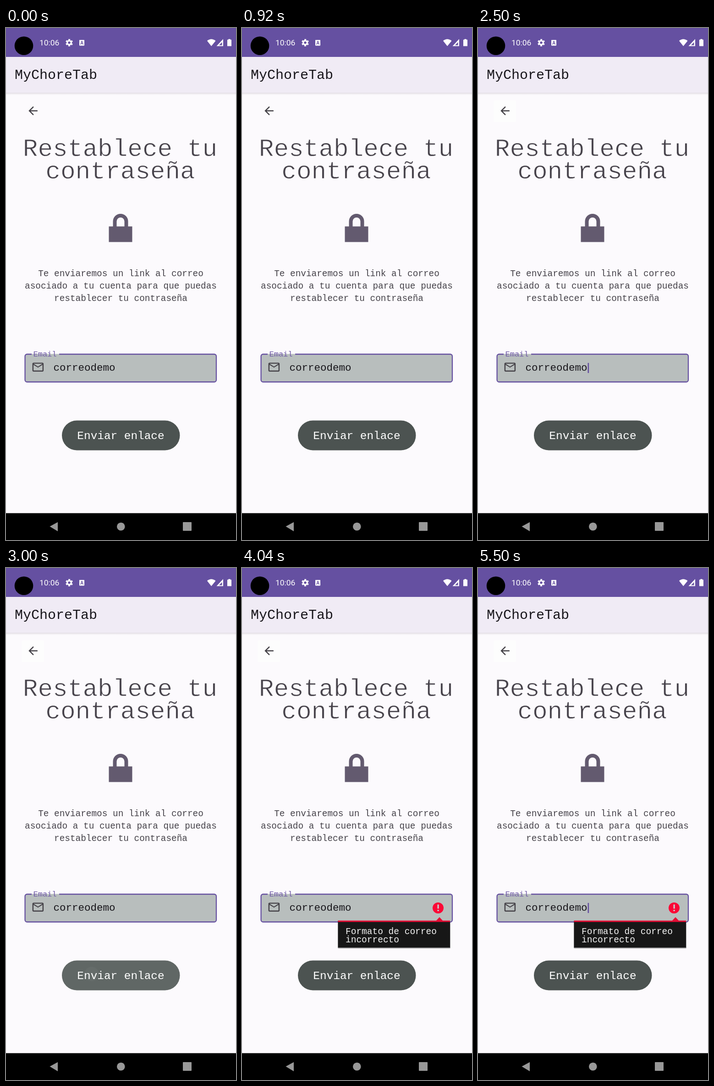
Recreate the animation shown at these times as an HTML page. Size 502 px wide and 1116 px high, loop 5.54 s.

```html
<!DOCTYPE html>
<html lang="es">
<head>
<meta charset="utf-8">
<title>Restablece tu contraseña</title>
<style>
  html, body { margin: 0; width: 100%; height: 100%; overflow: hidden; background: #fcfafd; }
  svg { display: block; width: 100%; height: 100%; }
  text { font-family: "Liberation Mono", monospace; white-space: pre; }
  .middle { text-anchor: middle; }
  /* The background-coloured outline thins the strokes of the large title. */
  .title { font-size: 54.4px; fill: #47434b; stroke: #fcfafd; stroke-width: .9px; }
  .message { font-size: 19.4px; fill: #454249; }
  .error { font-size: 19.5px; fill: #f4f4f4; }
</style>
</head>
<body>
<svg viewBox="0 0 502 1116">
  <defs>
    <linearGradient id="barShadow" x2="0" y2="1">
      <stop stop-color="#e2dde4"/>
      <stop offset="1" stop-color="#fcfafd"/>
    </linearGradient>
    <clipPath id="buttonShape"><rect x="122" y="855.500" width="257.500" height="65" rx="32.500"/></clipPath>
  </defs>
  <rect width="502" height="1116" fill="#fcfafd"/>

  <!-- Status bar -->
  <rect width="502" height="63" fill="#6550a1"/>
  <circle cx="39" cy="38.700" r="20.300"/>
  <g fill="#fff">
    <text x="73" y="38.300" style="font: 17.4px Roboto, sans-serif">10:06</text>
    <g fill="none" stroke="#fff" transform="rotate(30 138 32)">
      <circle cx="138" cy="32" r="4.300" stroke-width="3.200"/>
      <circle cx="138" cy="32" r="6.800" stroke-width="2.400" stroke-dasharray="3.8 3.32" stroke-dashoffset="1.900"/>
    </g>
    <rect x="160" y="26" width="11" height="12.500" rx="1"/>
    <text x="165.500" y="36" class="middle" fill="#6550a1" style="font: bold 10px Roboto, sans-serif">A</text>
    <path d="M439 28Q448 20.500 457.500 28L448.200 39.500Z"/>
    <path d="M474 24V39.500H459.500Z"/>
    <path d="M471.500 31V37.500H465Z" fill="#6550a1"/>
    <path d="M485.500 24h4v1.500h2.500V39.500H483V25.500h2.500Z"/>
  </g>

  <!-- App bar -->
  <rect y="63" width="502" height="78" fill="#f0ebf5"/>
  <rect y="141" width="502" height="5" fill="url(#barShadow)"/>
  <text x="19" y="111" font-size="30" fill="#17151a">MyChoreTab</text>

  <rect id="backPlate" x="34" y="158" width="49" height="47" rx="3" fill="#fdfdfd"/>
  <path transform="translate(44.400 165.800) scale(1.22)" fill="#444147"
    d="M20 11H7.830l5.590-5.590L12 4l-8 8 8 8 1.410-1.410L7.830 13H20z"/>

  <text class="title middle" x="249" y="279">Restablece tu</text>
  <text class="title middle" x="249.500" y="327.500">contraseña</text>

  <!-- Padlock -->
  <g fill="#635a6f">
    <rect x="224.500" y="432.500" width="51" height="34"/>
    <path d="M237.500 434V421.500a12.500 12.500 0 0 1 25 0V434" fill="none" stroke="#635a6f" stroke-width="8"/>
  </g>

  <text class="message middle" x="250.500" y="541">Te enviaremos un link al correo</text>
  <text class="message middle" x="250.500" y="568">asociado a tu cuenta para que puedas</text>
  <text class="message middle" x="250.500" y="595">restablecer tu contraseña</text>

  <!-- Email field -->
  <rect x="41" y="710.500" width="418" height="61" rx="5" fill="#b8bebd"/>
  <path d="M56 711H46a4.500 4.500 0 0 0-4.500 4.500V767a4.500 4.500 0 0 0 4.500 4.500H454.500a4.500 4.500 0 0 0 4.500-4.500V715.500a4.500 4.500 0 0 0-4.500-4.500H116"
    fill="none" stroke="#6650a0" stroke-width="2.300"/>
  <text x="59.500" y="716" font-size="17" fill="#6d58a5">Email</text>
  <path transform="translate(55.200 724.500) scale(1.22)" fill="#444147"
    d="M22 6c0-1.100-.9-2-2-2H4c-1.100 0-2 .9-2 2v12c0 1.100.9 2 2 2h16c1.100 0 2-.9 2-2V6zm-2 0l-8 5-8-5h16zm0 12H4V8l8 5 8-5v10z"/>
  <text x="103.500" y="747" font-size="22.500" fill="#17151a">correodemo</text>
  <rect id="cursor" x="239.500" y="730" width="2.600" height="22" fill="#6650a0"/>

  <!-- Button -->
  <g clip-path="url(#buttonShape)">
    <rect x="122" y="855" width="258" height="66" fill="#4c5351"/>
    <rect id="pressTint" x="122" y="855" width="258" height="66" fill="#fff"/>
    <circle id="ripple" cx="187" cy="885" fill="#fff"/>
  </g>
  <text class="middle" x="250.500" y="896" font-size="24.400" fill="#fff">Enviar enlace</text>

  <!-- Validation error -->
  <g id="error">
    <circle cx="428" cy="741" r="12" fill="#fb0736"/>
    <path d="M426.500 733.500h3.200v9h-3.200zm0 11.500h3.200v3h-3.200z" fill="#c8cccb"/>
    <rect x="209" y="771" width="246" height="58.500" rx="2" opacity=".3"/>
    <rect x="209.500" y="769" width="244.500" height="58.500" fill="#171717"/>
    <path d="M209.500 768.500H424l7-7.500 7 7.500H454v3H209.500z" fill="#e60b33"/>
    <text class="error" x="226" y="798">Formato de correo</text>
    <text class="error" x="226" y="815.500">incorrecto</text>
  </g>

  <!-- Navigation bar -->
  <rect y="1057.500" width="502" height="58.500"/>
  <g fill="#989898">
    <path d="M95.500 1086.500L113 1077V1097Z"/>
    <circle cx="250.800" cy="1086.700" r="8.800"/>
    <rect x="386" y="1077" width="19" height="19" rx="1"/>
  </g>
</svg>
<script>
  const LOOP = 5540, BLINK = 1000, BLINK_START = 300, FIRST_BLINK = 380;
  const PRESS = 2930, RELEASE = 3130;
  const byId = id => document.getElementById(id);
  const [cursor, backPlate, pressTint, ripple, error] =
    ["cursor", "backPlate", "pressTint", "ripple", "error"].map(byId);
  const progress = (t, start, length) => Math.min(1, Math.max(0, (t - start) / length));
  const show = (node, visible) => node.setAttribute("visibility", visible ? "visible" : "hidden");

  function draw(t) {
    const phase = (t - BLINK_START + BLINK) % BLINK;
    show(cursor, t >= FIRST_BLINK && phase < BLINK / 2);
    show(backPlate, t >= 960);
    show(error, t >= RELEASE);

    const fade = 1 - progress(t, RELEASE + 50, 250);
    pressTint.setAttribute("opacity", 0.115 * progress(t, PRESS, 70) * fade);
    const spread = progress(t, PRESS, 300);
    ripple.setAttribute("r", 210 * spread ** 1.8);
    ripple.setAttribute("opacity", 0.03 * fade);
  }

  function frame() {
    draw(performance.now() % LOOP);
    requestAnimationFrame(frame);
  }
  frame();
</script>
</body>
</html>
```
